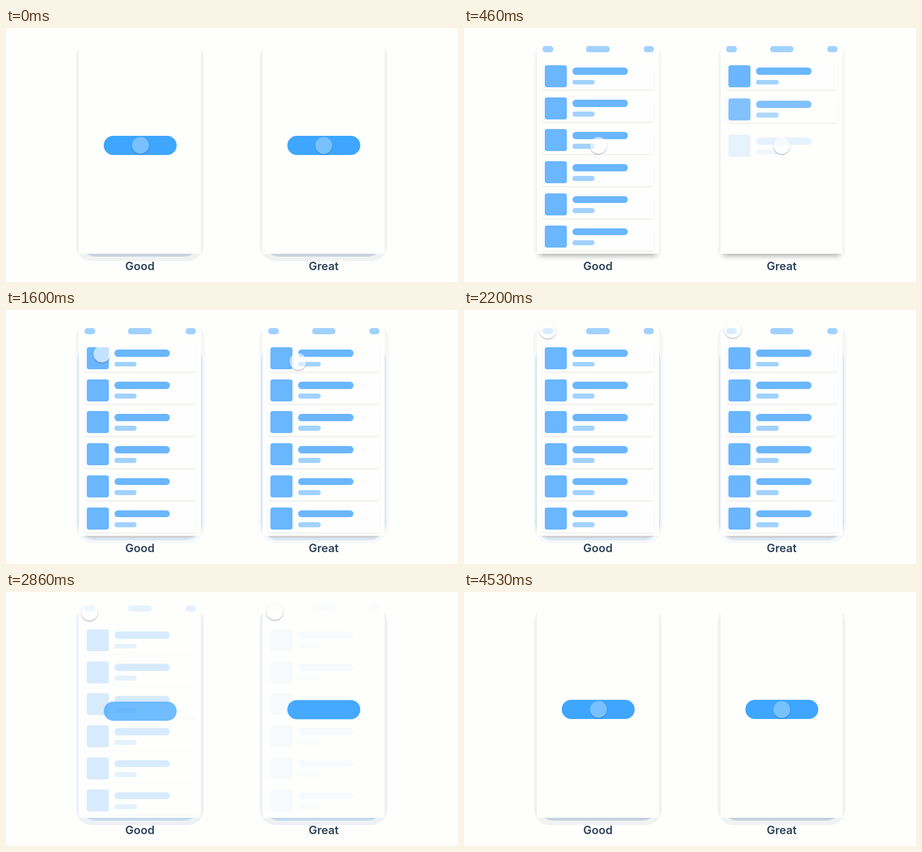
Animation of 800 by 450 pixels, one loop 4660 ms. Source, as an HTML page:

```html
<!DOCTYPE html>
<html lang="en">
<head>
<meta charset="utf-8">
<title>Good and great transitions</title>
<style>
  html, body { margin: 0; width: 100%; height: 100%; overflow: hidden; background: #fefefd; }
  #stage { position: relative; width: 800px; height: 450px; overflow: hidden; }
  #stage div { position: absolute; box-sizing: border-box; }
  .phone { top: 0; width: 475px; height: 450px; }
  .shade { left: 0; top: 0; width: 475px; height: 450px; clip-path: inset(30px 0 0 0); }
  .screen { left: 129px; top: 20px; width: 216px; height: 380px; background: #fefefd; }
  .soft { left: 129px; top: 34px; width: 216px; height: 366px;
    box-shadow: 0 9px 10px -6px rgba(0,0,0,.3), 0 3px 9px rgba(0,0,0,.07); }
  .card { background: #fefefe; border-radius: 4px; box-shadow: 0 2px 3px rgba(0,0,0,.07); }
  .button { background: #3ea6ff; }
  .touch { left: -15px; top: -15px; width: 30px; height: 30px; border-radius: 50%;
    box-shadow: 0 1px 1.5px rgba(35,50,85,.5); }
  .label { left: 137px; top: 410px; width: 200px; text-align: center; color: #2a4159;
    font: 600 20px/24px Inter, sans-serif; }
</style>
</head>
<body>
<div id="stage"></div>
<script>
const LOOP = 4660, STEP = 200 / 3, SHIFT = 12;
const BLUE = '#6ab6ff', PALE = '#a1d2ff';
const stage = document.getElementById('stage');

function add(parent, cls) {
  const el = document.createElement('div');
  if (cls) el.className = cls;
  return parent.appendChild(el);
}

function box(parent, x, y, w, h, r, color, cls) {
  const el = add(parent, cls);
  Object.assign(el.style, {
    left: x + 'px', top: y + 'px', width: w + 'px', height: h + 'px', borderRadius: r + 'px'
  });
  if (color) el.style.background = color;
  return el;
}

const clamp = v => Math.min(1, Math.max(0, v));
const smooth = v => v * v * (3 - 2 * v);
const part = (t, start, length) => clamp((t - start) / length);
const fade = (t, start, length) => smooth(part(t, start, length));
const cubic = v => v < .5 ? 4 * v ** 3 : 1 - 4 * (1 - v) ** 3;

// Same curve as cubic-bezier(.4, 0, .2, 1)
function standard(v) {
  let lo = 0, hi = 1;
  for (let i = 0; i < 24; i++) {
    const s = (lo + hi) / 2, q = 1 - s;
    if (1.2 * q * q * s + .6 * q * s * s + s ** 3 < v) lo = s; else hi = s;
  }
  return 3 * (1 - lo) * lo * lo + lo ** 3;
}

const curve = (a, c, b, u) => (1 - u) ** 2 * a + 2 * u * (1 - u) * c + u * u * b;

const SPECS = [
  { name: 'Good', x: 0, delay: 0, out: 2667, ease: standard, go: [1100, 1030], back: [3200, 1030],
    from: [148, 36], bend: [193, 122], to: [238, 208] },
  { name: 'Great', x: 325.3, delay: 400 / 3, out: 2600, ease: cubic, go: [1200, 750], back: [3300, 680],
    from: [150.7, 34.7], bend: [206.3, 92.7], to: [237.4, 208.3] }
];

function buildRow(parent, i) {
  const row = box(parent, 0, 61 + 56.9 * i, 475, 48, 0);
  box(row, 138.5, 0, 197.5, 48, 4, '', 'card');
  box(row, 143, 4.7, 39, 39, 4, BLUE);
  box(row, 191.5, 9.3, 98.5, 12.6, 6.3, BLUE);
  box(row, 191.5, 30.6, 39.8, 8.6, 4.3, PALE);
  return row;
}

function buildPhone(spec) {
  const root = add(stage, 'phone');
  root.style.left = spec.x + 'px';
  const shade = add(root, 'shade');
  const plain = add(shade), listed = add(shade), soft = add(shade, 'soft');
  const rim = box(plain, 124, 24, 226, 389, 28);
  const edge = box(plain, 129, 60, 216, 345, 30);
  box(listed, 122.5, 20, 229.5, 393, 31, '#f7f7f8');
  box(listed, 126, 60, 222, 348, 30, '#d9e7f4');
  box(listed, 129, 60, 216, 344, 24, '#d1d2d4');
  add(root, 'screen');

  const rows = Array.from({ length: 6 }, (_, i) => buildRow(root, i));
  const head = box(root, 0, 31.5, 475, 11, 0);
  for (const [x, w] of [[138.5, 19], [216.3, 41.7], [317.5, 18.7]]) box(head, x, 0, w, 11, 5, PALE);
  const button = box(root, 172.7, 191, 129, 33.5, 16.75, '', 'button');
  const touch = add(root, 'touch');
  add(root, 'label').textContent = spec.name;
  return { spec, plain, listed, soft, rim, edge, rows, head, button, touch };
}

function place(el, x, y) { el.style.transform = `translate(${x}px, ${y}px)`; }

function drawShade(p, t) {
  const soft = t >= 130 && t < 800, listed = t >= 800 && t < 2600;
  p.soft.style.opacity = +soft;
  p.listed.style.opacity = +listed;
  p.plain.style.opacity = +!(soft || listed);
  const tinted = t > 2500 && t < 3100;
  p.rim.style.background = tinted ? '#edf1f5' : '#f1f2f2';
  p.edge.style.background = tinted ? '#c3daec' : '#c6d3de';
}

function drawPhone(p, t) {
  const s = p.spec, leave = fade(t, s.out, 300);
  drawShade(p, t);

  p.rows.forEach((row, i) => {
    const enter = fade(t, 133.3 + s.delay * i, 266.7);
    row.style.opacity = enter * (1 - leave);
    place(row, 0, s.delay ? SHIFT * (1 - enter) : 0);
  });

  const shown = fade(t, 133.3, 266.7) * (1 - leave);
  p.head.style.opacity = shown;
  place(p.head, 0, -11 * (1 - shown));

  const lit = 1 - fade(t, 30, 270) + leave;
  p.button.style.opacity = lit;
  place(p.button, 0, SHIFT * (1 - lit));

  const u = 1 - s.ease(part(t, ...s.go)) + s.ease(part(t, ...s.back));
  place(p.touch, curve(s.from[0], s.bend[0], s.to[0], u), curve(s.from[1], s.bend[1], s.to[1], u));
  p.touch.style.background = `rgba(255,255,255,${.6 - .3 * lit})`;
}

const phones = SPECS.map(buildPhone);
const begin = performance.now();

function draw(now) {
  const time = Math.max(0, now - begin) % LOOP;
  const t = Math.floor((time + 6.7) / STEP) * STEP;
  phones.forEach(p => drawPhone(p, t));
  requestAnimationFrame(draw);
}
draw(begin);
</script>
</body>
</html>
```
